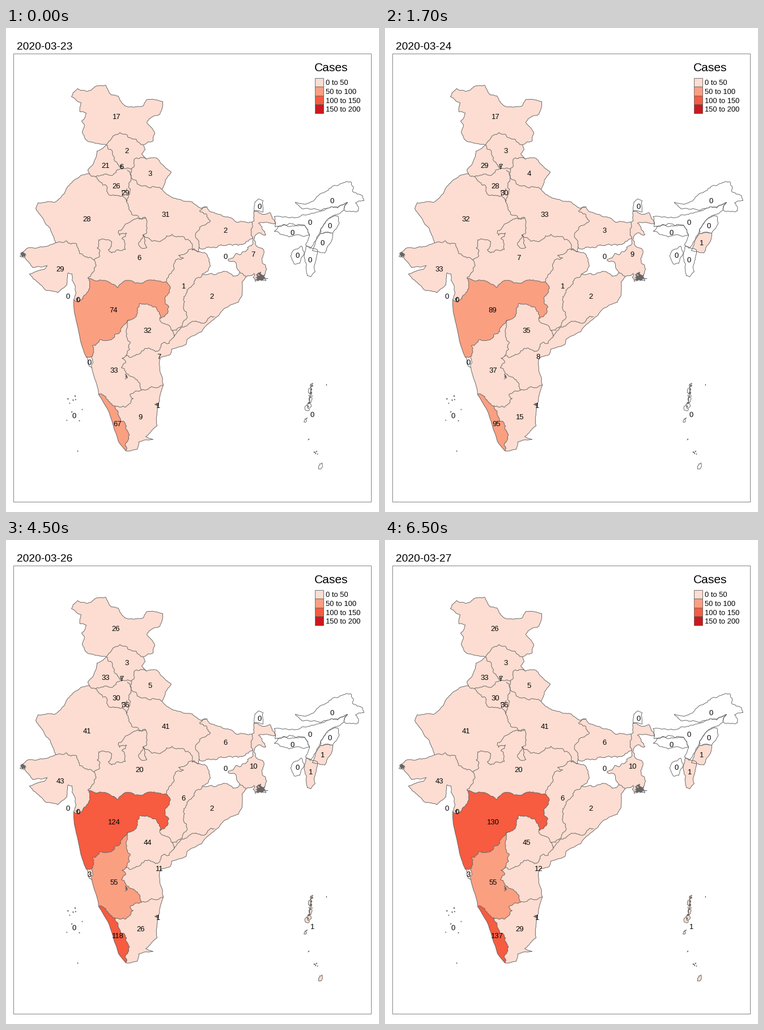
Animation of 658 by 851 pixels, one loop 8000 ms. Source, as a matplotlib script:

```python
import numpy as np
import matplotlib.pyplot as plt
from matplotlib.animation import FuncAnimation
from matplotlib.patches import Polygon, Rectangle

W, H, DPI = 658, 851, 100
PX = 72 / DPI
PALETTE = ["#fdddd1", "#fb9f81", "#f75b40", "#cb181d"]
EDGE = "#666666"

plt.rcParams["font.family"] = "Liberation Sans"
fig = plt.figure(figsize=(W / DPI, H / DPI), dpi=DPI, facecolor="white")
ax = fig.add_axes([0, 0, 1, 1])
ax.set(xlim=(0.5, W + 0.5), ylim=(H + 0.5, 0.5))
ax.axis("off")


def wiggle(p, q, rough):
    """Fractal line from p to q, the same in both directions."""
    if p > q:
        return wiggle(q, p, rough)[::-1]
    rng = np.random.default_rng(int(p[0] * 7 + p[1] * 131 + q[0] * 17 + q[1] * 1009))
    path = np.array([p, q], float)
    while np.hypot(*(path[1] - path[0])) > 3:
        step = np.diff(path, axis=0)
        normal = step[:, ::-1] * (-1, 1)
        middle = path[:-1] + step / 2 + normal * rng.uniform(-rough, rough, (len(step), 1))
        path = np.insert(path, np.arange(1, len(path)), middle, axis=0)
    return path


def line(path):
    ax.plot(*path.T, color=EDGE, lw=0.95 * PX, zorder=3, solid_joinstyle="round")


def arc(*points, rough=0.22):
    path = np.vstack([wiggle(p, q, rough) for p, q in zip(points, points[1:])])
    line(path)
    return path


def fill(*paths, color="white"):
    return ax.add_patch(Polygon(np.vstack(paths), fc=color, ec="none", zorder=2))


def region(*points, rough=0.16):
    return fill(arc(*points, points[0], rough=rough))


def scribble(x, y, w, h, n):
    rng = np.random.default_rng(int(x * 1000 + y))
    line(np.column_stack([rng.normal(x, w / 4, n), rng.normal(y, h / 4, n)]))


def text(x, y, s, size, **kw):
    return ax.text(x, y, s, size=size * PX, color="black", zorder=5, **kw)


# Outer boundary, clockwise from the north-west
jammu = arc(
    (178, 206), (145, 200), (135, 183), (139, 172), (134, 164), (142, 150), (131, 148),
    (133, 132), (116, 121), (119, 114), (127, 107), (143, 112), (157, 104), (176, 101),
    (186, 118), (198, 120), (208, 135), (243, 137), (248, 127), (262, 126), (277, 130),
    (272, 152), (253, 160), (249, 167), (263, 186), (260, 199), (243, 206), rough=0.12)
himalaya = arc(
    (243, 206), (246, 214), (240, 222), (248, 231), (265, 229), (292, 254), (276, 284),
    rough=0.1)
nepal = arc(
    (276, 284), (310, 303), (345, 318), (355, 315), (362, 324), (407, 342), (434, 342),
    (438, 340), rough=0.12)
bengal = arc(
    (438, 340), (438, 323), (466, 325), (475, 345), (446, 344), (459, 364), (441, 364),
    (440, 380), (453, 388), (452, 405), (459, 445), (440, 446), (438, 432), (424, 438))
east = arc(
    (424, 438), (417, 447), (417, 470), (410, 483), (385, 494), (345, 535), (320, 548),
    (318, 557), (293, 565), (290, 575), (273, 580), (272, 604), (278, 628), rough=0.07)
south = arc(
    (278, 628), (268, 665), (267, 700), (247, 719), (260, 724), (235, 728), (232, 741),
    (212, 744), rough=0.08)
malabar = arc((212, 744), (199, 728), (189, 697), (183, 678), (164, 645), rough=0.03)
kanara = arc((164, 645), (157, 617), (152, 598), rough=0.04)
goa_east = arc((152, 598), (154, 588), (152, 578))
goa_north = arc((152, 578), (142, 579))
goa_coast = arc((142, 579), (147, 595), (152, 598))
konkan = arc((142, 579), (133, 555), (121, 500), (120, 478), rough=0.03)
gujarat = arc(
    (120, 478), (124, 465), (117, 444), (117, 433), (110, 431), (108, 452), (92, 466),
    (72, 462), (42, 433), (68, 425), (73, 418), (48, 422), (26, 397), (37, 388),
    (70, 385), (88, 378), rough=0.1)
thar = arc(
    (88, 378), (78, 352), (57, 324), (53, 318), (57, 308), (73, 306), (86, 307),
    (104, 291), (112, 277), (132, 260), (148, 257), rough=0.1)
ravi = arc((148, 257), (145, 250), (160, 226), (161, 217), (178, 206), rough=0.1)

# Borders around the shaded states
mh_gj = arc((120, 478), (130, 480), (148, 458), (145, 440))
mh_mp = arc((145, 440), (158, 445), (190, 451), (197, 457), (208, 446), (222, 445), (228, 449),
            (283, 447), rough=0.12)
mh_cg = arc((283, 447), (281, 483), (288, 491), (286, 501), (272, 511))
mh_tg = arc((272, 511), (271, 500), (265, 491), (236, 485), (218, 514))
mh_ka = arc((218, 514), (206, 526), (153, 559), (152, 578))
ka_tg = arc((218, 514), (219, 552), (212, 577))
ka_ap = arc((212, 577), (205, 581), (212, 588), (204, 598), (218, 612), (232, 619), (240, 637))
ka_tn = arc((240, 637), (219, 645), (225, 652), (212, 667), (193, 665))
ka_kl = arc((193, 665), (178, 653), (164, 645))
kl_tn = arc((193, 665), (203, 692), (213, 700), (212, 744))
jh_br = arc((341, 386), (386, 383), (424, 376), (436, 370))
jh_wb = arc((436, 370), (424, 393), (392, 408), (413, 430))
jh_od = arc((413, 430), (401, 437), (390, 429), (347, 433))
jh_cg = arc((347, 433), (361, 419), (341, 394), (341, 386))

# Himachal, Punjab, Uttarakhand
arc((178, 206), (192, 189), (230, 196), (243, 206))
arc((178, 206), (188, 217), (192, 228), (207, 247), (222, 248))
arc((248, 231), (226, 233), (222, 248), (221, 263), (248, 278), (276, 284))
arc((207, 247), (190, 258), (158, 262), (148, 257))
# Haryana and the capital
arc((158, 262), (178, 278), (180, 290), (206, 296), (213, 306), (219, 290), (215, 250))
arc((206, 296), (205, 286), (214, 283))
# Rajasthan
arc((213, 306), (222, 328), (247, 334), (199, 357), (201, 365), (213, 361), (205, 371),
    (211, 390), (187, 396), (181, 390), (187, 376), (164, 373), (166, 401), (155, 408))
arc((88, 378), (125, 380), (136, 400), (155, 408), (156, 428), (145, 440))
# Ganges plain
arc((247, 334), (248, 362), (234, 380), (241, 388), (249, 386), (242, 364), (312, 367),
    (329, 391), (341, 394))
arc((355, 315), (342, 322), (361, 340), (342, 351), (341, 386))
arc((434, 342), (433, 358), (436, 370))
# Central and eastern states
arc((341, 394), (305, 400), (314, 405), (292, 432), (283, 447))
arc((347, 433), (327, 456), (314, 486), (316, 514), (293, 532))
arc((413, 430), (424, 438))
arc((368, 508), (327, 518), (297, 543), (293, 532), (272, 511))
arc((297, 543), (274, 557), (268, 569), (212, 577))
arc((240, 637), (257, 631), (278, 628))

fill(jammu, himalaya, nepal, bengal, east, south, malabar, kanara, goa_east, goa_north,
     konkan, gujarat, thar, ravi, color=PALETTE[0])
fill(jh_br, jh_wb, jh_od, jh_cg)
maharashtra = fill(konkan, mh_gj, mh_mp, mh_cg, mh_tg, mh_ka, goa_north)
karnataka = fill(ka_tg, ka_ap, ka_tn, ka_kl, kanara, goa_east, mh_ka[::-1])
kerala = fill(kl_tn, malabar, ka_kl[::-1])
goa = fill(goa_coast, goa_east[::-1], goa_north)

# North-east: Sikkim, Arunachal, Assam, Meghalaya, Nagaland, Manipur, Mizoram, Tripura
region((438, 322), (440, 306), (446, 301), (454, 304), (454, 324), rough=0.1)
region((511, 307), (520, 309), (552, 295), (576, 279), (609, 271), (612, 288), (629, 295),
       (632, 304), (617, 308), (622, 322), (597, 320), (603, 307), (566, 318), (522, 318))
region((474, 332), (523, 329), (566, 318), (603, 307), (597, 320), (559, 350), (548, 372),
       (537, 388), (529, 382), (536, 365), (527, 347), (475, 350), rough=0.12)
region((474, 358), (480, 350), (527, 347), (536, 365), (500, 368))
region((555, 362), (559, 350), (586, 331), (588, 342), (577, 361))
manipur = region((555, 362), (577, 361), (575, 375), (563, 396), (541, 392), (548, 372),
                 rough=0.1)
mizoram = region((527, 396), (530, 384), (550, 391), (544, 419), (546, 429), (538, 438),
                 (532, 436), rough=0.1)
region((503, 401), (508, 391), (522, 384), (527, 396), (519, 414), (510, 416), rough=0.1)

# Island chain, north to south
andaman = [region((x, y), (x + 4, y - 2), (x + 2, y + h), (x - 2, y + h), rough=0.3)
           for x, y, h in [(538, 627, 16), (536, 643, 16), (533, 660, 13), (528, 688, 5),
                           (554, 767, 9)]]
for k in range(7):
    scribble(540 - k, 630 + 6 * k, 4, 7, 7)

# Mangroves, creeks and enclaves too fine to draw
scribble(450, 439, 17, 14, 80)
scribble(31, 399, 9, 10, 35)
for x, y in [(266, 663), (204, 243), (127, 477), (213, 613)]:
    scribble(x, y, 6, 7, 12)

# Scattered islets
rng = np.random.default_rng(5)
for x, y, spread, n in [(120, 670, 13, 9), (127, 744, 0, 1), (549, 747, 3, 5),
                        (535, 724, 0, 1), (566, 628, 0, 1)]:
    for dx, dy in rng.normal(0, 1, (n, 2)) * spread:
        scribble(x + dx, y + dy, 2, 2.5, 5)

# Frame, title and legend
ax.add_patch(Rectangle((13, 45), 631.5, 788.5, fc="none", ec="#666666", lw=0.8 * PX))
title = text(19.5, 38, "", 19.2)
text(544.5, 77, "Cases", 21)
for i, color in enumerate(PALETTE):
    y = 88 + 15.5 * i
    ax.add_patch(Rectangle((545, y), 15.5, 15.5, fc=color, ec=EDGE, lw=0.9 * PX))
    text(564.5, y + 13, f"{50 * i} to {50 * i + 50}", 12.9)

# Daily counts by label position
north = {
    (194, 156): (17, 17, 20, 26, 26), (213.5, 216): (2, 3, 3, 3, 3),
    (175.5, 241): (21, 29, 29, 33, 33), (204, 243): (6, 7, 7, 7, 7),
    (254, 256): (3, 4, 4, 5, 5), (195, 277): (26, 28, 28, 30, 30),
    (211, 289): (29, 30, 31, 36, 36), (143, 336): (28, 32, 36, 41, 41),
    (282, 328): (31, 33, 37, 41, 41), (387, 356): (2, 3, 4, 6, 6),
}
south_and_centre = {
    (96, 423): (29, 33, 38, 43, 43), (235.5, 404): (6, 7, 14, 20, 20),
    (436, 398): (7, 9, 9, 10, 10), (313, 454): (1, 1, 1, 6, 6),
    (250, 532): (32, 35, 35, 44, 45), (270, 578): (7, 8, 9, 11, 12),
    (237.5, 683): (9, 15, 18, 26, 29),
}
shaded = [
    ([maharashtra], (190, 495), (74, 89, 128, 124, 130)),
    ([karnataka], (191, 601), (33, 37, 41, 55, 55)),
    ([kerala], (196.5, 696), (67, 95, 109, 118, 137)),
    ([goa], (147, 587), (0, 0, 0, 3, 3)),
    (andaman, (540, 679), (0, 0, 0, 1, 1)),
    ([manipur], (558, 377), (0, 1, 1, 1, 1)),
    ([mizoram], (536.5, 408), (0, 0, 1, 1, 1)),
]
zero_spots = [(447, 314), (575, 303), (536.5, 341), (571, 348), (505, 359), (514, 399),
              (387, 401), (109.5, 471), (127, 478), (120.5, 682)]


def label(spot, value=""):
    return text(spot[0] + 0.5, spot[1] + 5, str(value), 13, ha="center")


for spot in zero_spots:
    label(spot, 0)
label((362.5, 471), 2)
label((268, 663), 1)
counters = [(label(spot), counts) for spot, counts in (north | south_and_centre).items()]
counters += [(label(spot), counts) for _, spot, counts in shaded]


def shade(count):
    return PALETTE[(count - 1) // 50] if count else "white"


def update(frame):
    day = (frame + 3) // 4
    title.set_text(f"2020-03-{23 + day}")
    for item, counts in counters:
        item.set_text(str(counts[day]))
    for patches, _, counts in shaded:
        for patch in patches:
            patch.set_facecolor(shade(counts[day]))
    return []


anim = FuncAnimation(fig, update, frames=16, interval=500, repeat=True, repeat_delay=0)
plt.show()
```
